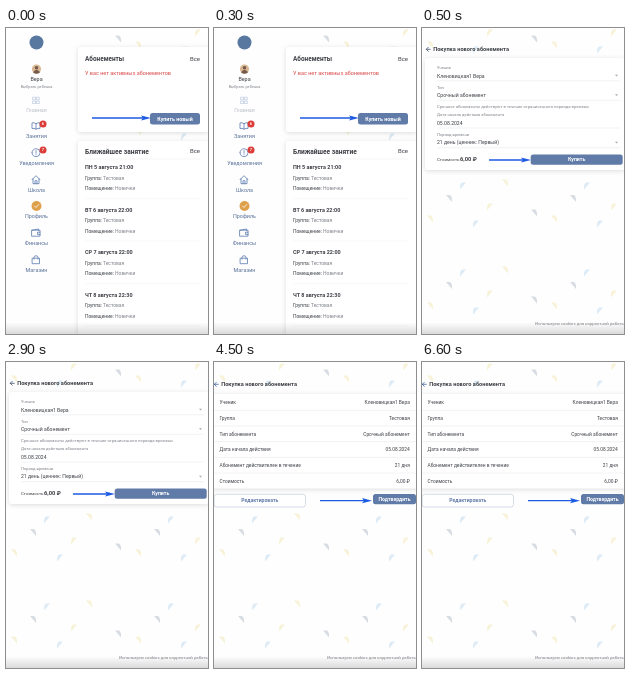
Recreate the animation shown at these times as an HTML page. Size 202x306 px, loop 8000 ms.

```html
<!DOCTYPE html>
<html lang="ru">
<head>
<meta charset="utf-8">
<style>
  html, body { margin: 0; width: 100%; height: 100%; overflow: hidden; background: #fefefe; }
  svg { display: block; width: 100vw; height: 100vh; }
  text { font-family: Roboto, "Noto Sans", sans-serif; fill: #3c3f45; }
  .bold { font-weight: 700; }
  .medium { font-weight: 500; }
  .muted { fill: #7d8188; }
  .mid { text-anchor: middle; }
  .end { text-anchor: end; }
  .card { fill: #fff; filter: drop-shadow(0 1px 2.5px #0002); }
  .icon { fill: none; stroke: #5c7daf; stroke-width: .8; stroke-linejoin: round; stroke-linecap: round; }
</style>
</head>
<body>
<svg viewBox="0 0 202 306" preserveAspectRatio="none">
  <defs>
    <path id="leaf" d="M-3-3.5H1Q3.5-2 3 3.5Z"/>
    <pattern id="confetti" width="124" height="87" patternUnits="userSpaceOnUse">
      <g fill="#d8dce3">
        <use href="#leaf" x="27" y="83.5"/><use href="#leaf" x="27" y="-3.5"/>
        <use href="#leaf" x="112" y="11"/>
      </g>
      <g fill="#dcebf5">
        <use href="#leaf" transform="translate(41 71) scale(-1 1)"/>
        <use href="#leaf" transform="translate(54 22) scale(-1 1)"/>
      </g>
      <g fill="#f7f2d8">
        <use href="#leaf" x="83" y="68"/><use href="#leaf" x="8" y="17"/>
        <use href="#leaf" transform="translate(68 5) scale(-1 1)"/>
      </g>
    </pattern>
    <linearGradient id="fade" x2="0" y2="1">
      <stop stop-opacity="0"/><stop offset="1" stop-opacity=".14"/>
    </linearGradient>
  </defs>
  <rect width="202" height="306" fill="#fefefe"/>
  <rect width="202" height="306" fill="url(#confetti)"/>
  <g id="home"></g>
  <g id="purchase"></g>
  <g id="confirm"></g>
  <rect y="294" width="202" height="12" fill="url(#fade)"/>
</svg>
<script>
const BLUE = '#607ba8';
const STUDENT = 'Кленовицкая1 Вера';

// y is the vertical centre of the text line
const text = (x, y, value, cls = '', size = 4.8, color = '') =>
  `<text x="${x}" y="${y + size * .35}" class="${cls}" style="font-size:${size}px${color && ';fill:' + color}">${value}</text>`;
const box = (x, y, w, h, r, attrs) =>
  `<rect x="${x}" y="${y}" width="${w}" height="${h}" rx="${r}" ${attrs}/>`;
const card = (x, y, w, h) => box(x, y, w, h, 3, 'class="card"');
const rule = (x1, x2, y, color) =>
  `<path d="M${x1} ${y}H${x2}" stroke="${color}" stroke-width=".5"/>`;
const dot = (x, y, r, color) => `<circle cx="${x}" cy="${y}" r="${r}" fill="${color}"/>`;
const button = (x, y, w, h, label, size) =>
  box(x, y, w, h, 2.5, `fill="${BLUE}"`) + text(x + w / 2, y + h / 2, label, 'mid bold', size, '#fff');
const pointer = (x1, x2, y) =>
  `<path d="M${x1} ${y}H${x2 - 7}" stroke="#1c5ae2" stroke-width="1.3"/>
   <path d="M${x2} ${y}l-10-2.6 2 2.6-2 2.6z" fill="#1c5ae2"/>`;
const badge = (y, count) => dot(37, y, 3.5, '#dc3d38') + text(37, y, count, 'mid bold', 4, '#fff');
const caret = y => `<path d="M193 ${y}h3l-1.5 1.7z" fill="#a3a6ab"/>`;
const title = (x, y, arrowColor) =>
  `<path d="M${x + 4.3} ${y}h-4m2-2-2 2 2 2" class="icon" style="stroke:${arrowColor}"/>` +
  text(x + 7.2, y, 'Покупка нового абонемента', 'bold', 5.65);
const footer = text(113, 295.8, 'Используем cookies для корректной работы', 'muted', 4.3);

function homeScreen() {
  const menu = [
    [82.5, 'Главная', 'M-3-3h2.5v2.5h-2.5zM.8-3h2.5v2.5H.8zM-3 .8h2.5v2.5h-2.5zM.8.8h2.5v2.5H.8z'],
    [108, 'Занятия', 'M0-2Q-2-3.5-4-2.8V2.8Q-2 2.2 0 3.5 2 2.2 4 2.8V-2.8Q2-3.5 0-2V3.5'],
    [135, 'Уведомления', 'M-4 0A4 4 0 0 0 4 0 4 4 0 0 0-4 0M0-2V.5M0 2V2.1'],
    [162, 'Школа', 'M-4 0 0-4 4 0M-3-1V4H3V-1M-1 4V1H1V4'],
    [188, 'Профиль', ''],
    [215, 'Финансы', 'M-4-2.5 2.5-3.7V-2.5M-4-2.5H4V3.5H-4zM4-.5H1.5V1.7H4'],
    [242, 'Магазин', 'M-3.5-1.5H3.5V4H-3.5zM-2-.5V-2Q-2-4 0-4T2-2V-.5'],
  ];
  const sidebar = menu.map(([y, label, icon], i) =>
    `<path d="${icon}" class="icon" transform="translate(30 ${y - 10.3})" ${i ? '' : 'opacity=".35"'}/>` +
    text(30.5, y, label, 'mid', 5.4, i ? '#566f99' : '#b9bdc5')).join('');
  const lessons = ['ПН 5 августа 21:00', 'ВТ 6 августа 22:00', 'СР 7 августа 22:00', 'ЧТ 8 августа 22:30'];
  const schedule = lessons.map((when, i) => {
    const y = 139.4 + i * 42.5;
    return text(79, y, when, 'bold', 5.45) +
      text(79, y + 10.8, 'Группа: <tspan class="muted">Тестовая</tspan>', '', 4.95) +
      text(79, y + 21.3, 'Помещение: <tspan class="muted">Новички</tspan>', '', 4.95) +
      rule(79, 194, y + 31, '#f0f1f3');
  }).join('');
  return box(0, 0, 72, 306, 0, 'fill="#fefefe"') +
    dot(30.5, 14.5, 7, '#59789f') +
    dot(30.5, 41, 4.6, '#d9b994') + dot(30.5, 39.8, 1.8, '#765b4c') +
    '<path d="M27 44.2q3.5-5 7 0-3.5 3-7 0" fill="#765b4c"/>' +
    text(30.5, 51.3, 'Вера', 'mid', 5.4) + text(30.5, 59, 'Выбрать ребенка', 'mid muted', 3.9) +
    sidebar + badge(96, 6) + badge(122, 7) + dot(30.5, 178, 5, '#dfa04b') +
    '<path d="M28.5 178l1.5 1.5 2.7-3" class="icon" style="stroke:#fff"/>' +
    card(72, 19, 131, 85) + text(79, 30.5, 'Абонементы', 'bold', 6.4) +
    text(194, 30.5, 'Все', 'end', 6) +
    text(79, 45.2, 'У вас нет активных абонементов', '', 5.5, '#d84747') +
    pointer(86, 145, 90) + button(144, 85, 50, 11.5, 'Купить новый', 5.3) +
    card(72, 113, 131, 201) + text(79, 123.3, 'Ближайшее занятие', 'bold', 6.6) +
    text(194, 123.3, 'Все', 'end', 6) + rule(79, 194, 131, '#e9eaed') + schedule;
}

function purchaseScreen() {
  const fields = [
    [39.8, 'Ученик', STUDENT, true],
    [59.3, 'Тип', 'Срочный абонемент', true],
    [87, 'Дата начала действия абонемента', '05.08.2024', false],
    [106.7, 'Период времени', '21 день (ценник: Первый)', true],
  ];
  return title(4, 21.3, '#42516b') + card(3, 30, 200, 112) +
    fields.map(([y, label, value, select]) =>
      text(15, y, label, 'muted', 4.1) + text(15, y + 8, value, '', 5.1) +
      rule(15, 198, y + 13, '#e3e4e8') + (select ? caret(y + 7) : '')).join('') +
    text(15, 78.2, 'Срочные абонементы действуют в течение ограниченного периода времени', 'muted', 4.2) +
    text(15, 131, 'Стоимость:', '', 4.4) + text(38, 130.7, '6,00 ₽', 'bold', 5.8) +
    pointer(67, 109, 132) + button(108.7, 126.4, 92, 10.3, 'Купить', 5.2) + footer;
}

function confirmScreen() {
  const rows = [
    ['Ученик', STUDENT], ['Группа', 'Тестовая'], ['Тип абонемента', 'Срочный абонемент'],
    ['Дата начала действия', '05.08.2024'], ['Абонемент действителен в течение', '21 дня'],
    ['Стоимость', '6,00 ₽'],
  ];
  return title(0, 22.3, '#4564a5') + card(-4, 32, 210, 94.5) +
    rows.map(([label, value], i) => {
      const y = 40.5 + i * 15.7;
      return text(5.5, y, label, '', 4.85) + text(195.8, y, value, 'end', 4.85) +
        (i < 5 ? rule(0, 202, y + 7.8, '#e3e4e8') : '');
    }).join('') +
    box(.2, 132.3, 91.3, 12.7, 2.5, 'fill="#fff" stroke="#b9c5d9" stroke-width=".6"') +
    text(45.8, 138.6, 'Редактировать', 'mid bold', 5.1, BLUE) +
    pointer(106, 158, 138.7) + button(159, 132, 43, 10.3, 'Подтвердить', 5.1) + footer;
}

const screens = [
  { id: 'home', start: 0, end: 500, draw: homeScreen },
  { id: 'purchase', start: 500, end: 4500, draw: purchaseScreen },
  { id: 'confirm', start: 4500, end: 8000, draw: confirmScreen },
];
for (const s of screens) {
  s.node = document.getElementById(s.id);
  s.node.innerHTML = s.draw();
}

const began = performance.now();
function render() {
  const time = (performance.now() - began) % 8000;
  for (const s of screens) s.node.style.display = time >= s.start && time < s.end ? '' : 'none';
  requestAnimationFrame(render);
}
render();
</script>
</body>
</html>
```
